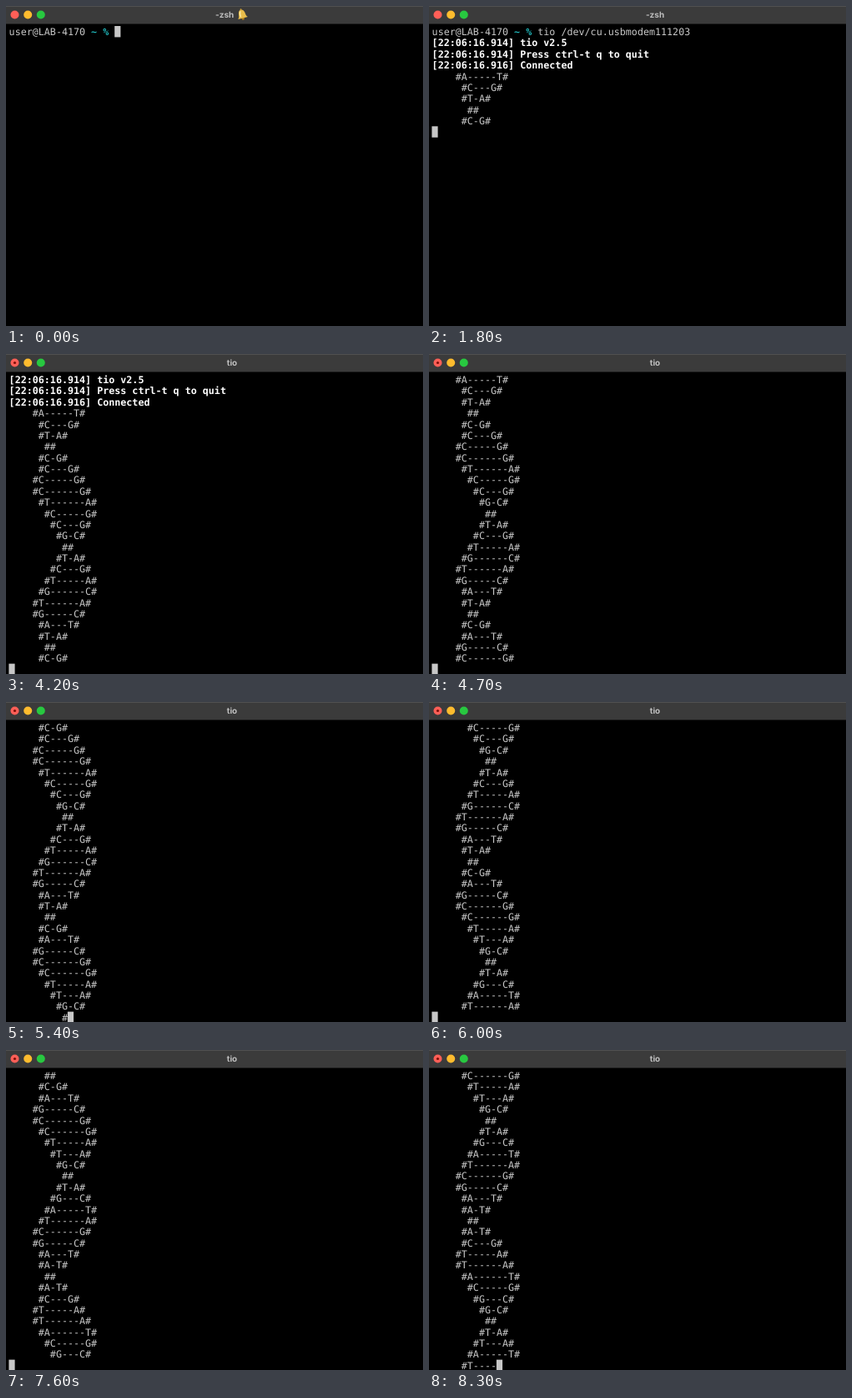
An HTML page that plays this animation: 500x384 px, repeating every 8.4 s.

```html
<!DOCTYPE html>
<html lang="en">
<head>
<meta charset="utf-8">
<title>Terminal</title>
<style>
  html, body { margin: 0; width: 100%; height: 100%; overflow: hidden; background: #000; }
  svg { display: block; width: 100vw; height: 100vh; }
  text { text-rendering: geometricPrecision; white-space: pre; }
  #rows { font: 11.7px "DejaVu Sans Mono", monospace; fill: #c7c7c7; }
  #rows .strong { font-weight: 700; fill: #fff; }
  #rows .accent { font-weight: 700; fill: #1fb5b8; }
  #title { font: 700 10px Inter, sans-serif; fill: #bdbdbd; }
</style>
</head>
<body>
<svg viewBox="0 0 500 384">
  <rect width="500" height="384" fill="#000"/>
  <rect width="500" height="21.5" fill="#3b3b3b"/>
  <rect width="500" height="1" fill="#505050"/>
  <circle cx="10.5" cy="10.5" r="5" fill="#ff5f57"/>
  <circle id="busy" cx="10.5" cy="10.5" r="1.6" fill="#7d0f0a"/>
  <circle cx="26.2" cy="10.5" r="5" fill="#febc2e"/>
  <circle cx="41.8" cy="10.5" r="5" fill="#28c840"/>
  <text id="title" y="13.8"></text>
  <g id="bell" transform="translate(283 10) rotate(-14)">
    <circle cy="5.2" r="1.7" fill="#a87819"/>
    <path d="M-6 4.6C-4 3-4.3 1-3.8-1.6C-3.3-4.4-1.8-5.6 0-5.6S3.3-4.4 3.8-1.6C4.3 1 4 3 6 4.6Z" fill="#e9bd4b"/>
    <path d="M-2.2 2.8C-2.4 0-2.2-3-.8-4" fill="none" stroke="#fff0b0" stroke-width="1.3"/>
    <circle cy="-6" r="1" fill="#d3a233"/>
  </g>
  <g id="rows"></g>
  <rect id="cursor" width="7.2" height="13.4" fill="#c7c7c7"/>
</svg>
<script>
const LOOP = 8400, ROWS = 27, CHAR = 7.044, LINE = 13.37, LEFT = 3.6, TOP = 24;
const $ = id => document.getElementById(id);

// One helix turn: indent and number of dashes per line; -1 marks a crossing.
const INDENT = [4, 5, 5, 6, 5, 5, 4, 4, 5, 6, 7, 8, 9, 8, 7, 6, 5, 4];
const DASHES = [5, 3, 1, -1, 1, 3, 5, 6, 6, 5, 3, 1, -1, 1, 3, 5, 6, 6];
const BASES = "ACT#CCCCTCCG#TCTGT" + "GAT#CAGCCTTG#TGATC" + "GAA#ACTTACGG#TTAT";
const PAIR = { A: "T", T: "A", C: "G", G: "C" };

// Printing bursts: [start in tenths of a second, lines, one every tenth]
const BURSTS = [[14, 3], [18, 1], [18, 1], [20, 2], [23, 2], [26, 2], [29, 5], [35, 2],
  [38, 5], [44, 1], [46, 2], [49, 2], [52, 2], [55, 2], [58, 8], [67, 2], [70, 2],
  [73, 2], [76, 2], [79, 2], [82, 2]];
// Half-received lines: tenth of a second -> characters shown
const PARTIAL = { 54: 10, 83: 11 };

const PROMPT = 'user@LAB-4170 <tspan class="accent">~ %</tspan> ';
const PROMPT_LENGTH = 18;
const COMMAND = "tio /dev/cu.usbmodem111203";
const strong = s => `<tspan class="strong">${s}</tspan>`;
const HEADER = ["[22:06:16.914] tio v2.5", "[22:06:16.914] Press ctrl-t q to quit",
  "[22:06:16.916] Connected"].map(strong);

function helixLine(i) {
  const k = i % INDENT.length, base = BASES[i];
  const body = DASHES[k] < 0 ? "" : base + "-".repeat(DASHES[k]) + PAIR[base];
  return " ".repeat(INDENT[k]) + "#" + body + "#";
}

const linesAt = tick => BURSTS.reduce((sum, [start, count]) =>
  sum + Math.max(0, Math.min(count, tick - start + 1)), 0);

const rows = Array.from({ length: ROWS }, (_, r) => {
  const row = document.createElementNS("http://www.w3.org/2000/svg", "text");
  row.setAttribute("x", LEFT);
  row.setAttribute("y", TOP + 11.1 + r * LINE);
  return $("rows").appendChild(row);
});

function screenAt(tick) {
  if (tick < 3) return { lines: [PROMPT], column: PROMPT_LENGTH };
  const lines = [PROMPT + COMMAND];
  if (tick < 13) return { lines, column: PROMPT_LENGTH + COMMAND.length };
  const count = linesAt(tick), column = PARTIAL[tick] || 0;
  lines.push(...HEADER);
  for (let i = 0; i < count; i++) lines.push(helixLine(i));
  lines.push(column ? helixLine(count).slice(0, column) : "");
  return { lines: lines.slice(-ROWS), column };
}

let shown = -1;
function render(time) {
  const tick = Math.floor((time % LOOP) / 100);
  if (tick === shown) return;
  shown = tick;

  const { lines, column } = screenAt(tick);
  rows.forEach((row, r) => { row.innerHTML = lines[r] || ""; });
  $("cursor").setAttribute("x", LEFT - 0.2 + column * CHAR);
  $("cursor").setAttribute("y", TOP + (lines.length - 1) * LINE);

  const alert = tick < 3, running = tick >= 20;
  $("title").textContent = running ? "tio" : "-zsh";
  $("title").setAttribute("x", alert ? 251 : 271);
  $("title").setAttribute("text-anchor", alert ? "start" : "middle");
  $("bell").style.display = alert ? "" : "none";
  $("busy").style.display = running ? "" : "none";
}

const start = performance.now();
function frame() {
  render(performance.now() - start);
  requestAnimationFrame(frame);
}
frame();
</script>
</body>
</html>
```
